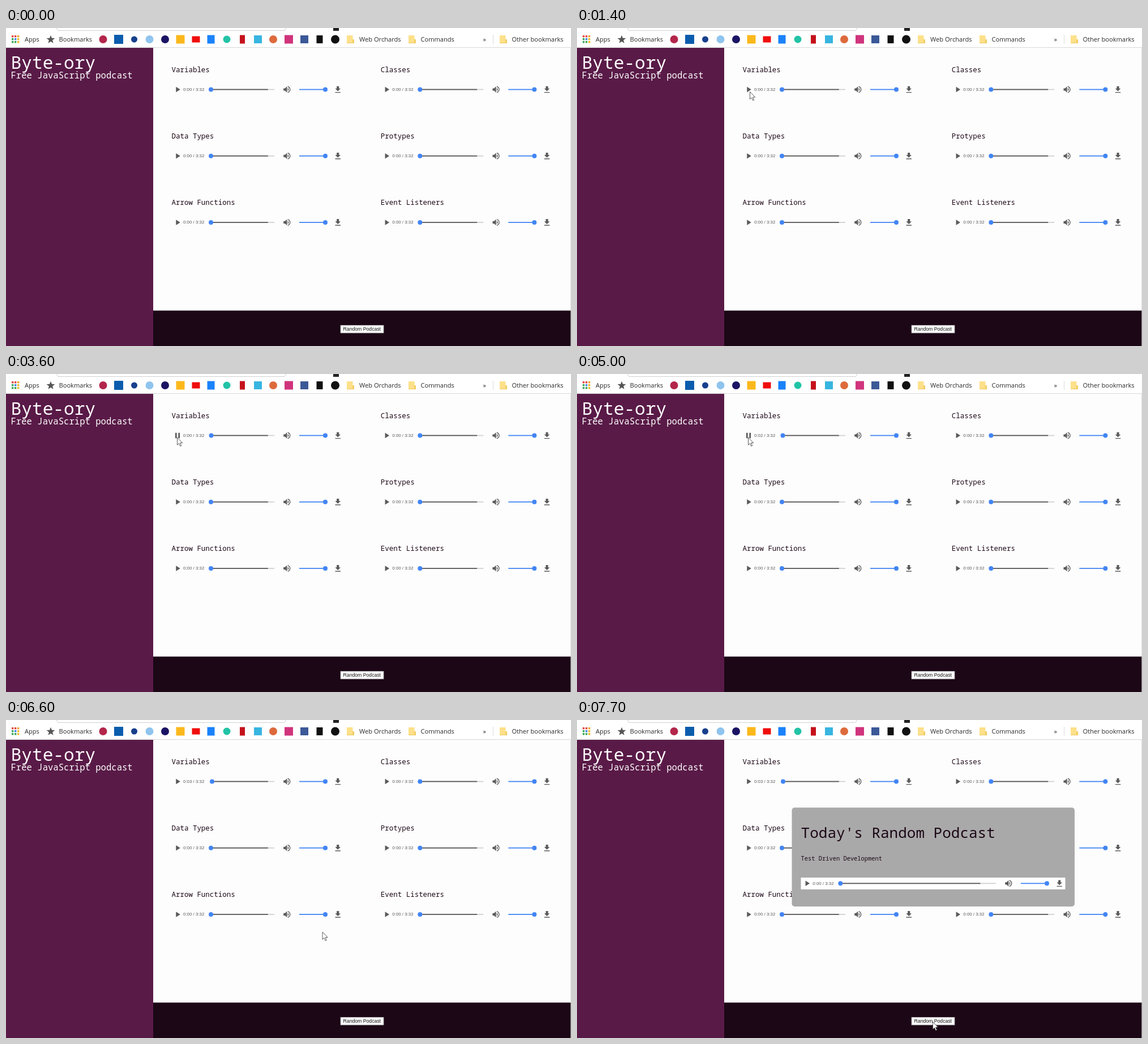
Recreate the animation shown at these times as an HTML page with a canvas. Size 998 by 561 pixels, loop 8000 ms.

```html
<!DOCTYPE html>
<html lang="en">
<head>
<meta charset="utf-8">
<title>Podcast page</title>
<style>
  html, body { margin: 0; width: 100%; height: 100%; overflow: hidden; background: #fdfdfd; }
  canvas { display: block; }
</style>
</head>
<body>
<canvas id="stage" width="998" height="561"></canvas>
<script>
const ctx = document.getElementById('stage').getContext('2d');
const LOOP = 8000;
const MONO = '"Noto Sans Mono", "DejaVu Sans Mono", monospace';
const ARIAL = '"Liberation Sans", Arial, sans-serif';
const UI = '"Open Sans", "Noto Sans", sans-serif';
const INK = '#1c0716', GREY = '#5a5a5a', BLUE = '#4285f4';

const ICON = {
  play: new Path2D('M8 5v14l11-7z'),
  pause: new Path2D('M6 19h4V5H6zM14 5v14h4V5z'),
  volume: new Path2D('M3 9v6h4l5 5V4L7 9H3zm13.5 3c0-1.77-1.02-3.29-2.5-4.03v8.05c1.48-.73 2.5-2.25 2.5-4.02zM14 3.23v2.06c2.89.86 5 3.54 5 6.71s-2.11 5.85-5 6.71v2.06c4.01-.91 7-4.49 7-8.77s-2.99-7.86-7-8.77z'),
  download: new Path2D('M19 9h-4V3H9v6H5l7 7 7-7zM5 18v2h14v-2H5z')
};
const ARROW = new Path2D('M0 0V13.2L3 10.4L5.2 15.4L7.2 14.5L5 9.6H9.2Z');

// Bookmark icons: centre x, colour, width, height (no height: circle)
const MARKS = [
  [171.5, '#b3264a', 14], [199, '#0b5cad', 16, 16], [226.5, '#173f8c', 11],
  [253.5, '#8fc4ee', 14], [281, '#1b1464', 14], [308, '#fbb81b', 15, 15],
  [335.5, '#f00d0d', 14, 11], [362, '#1a82fb', 13, 15], [390, '#22c3a6', 13],
  [417.5, '#c4121c', 9, 15], [445, '#38b5e0', 14, 14], [472, '#dd6a3c', 14],
  [499.5, '#d0347c', 15, 15], [527, '#3b5998', 14, 14], [554, '#111', 11, 14],
  [581.5, '#111', 15]
];
const DOTS = ['#e2483d', '#e2483d', '#f0a92c', '#3aa757', '#4285f4', '#f0b92c', '#3aa757', '#3aa757', '#f0b92c'];
const TITLES = [['Variables', 'Classes'], ['Data Types', 'Protypes'], ['Arrow Functions', 'Event Listeners']];

// Pointer: time, x, y (held until the next entry)
const POINTER = [
  [100, 491, 3], [200, 491, 11], [600, 466, 13], [700, 418, 20], [800, 379, 29],
  [1100, 367, 45], [1200, 338, 78], [1300, 314, 104], [1400, 305, 112], [1600, 302, 111.5],
  [6200, 483, 286.5], [6400, 525, 320.5], [6600, 558.5, 373.5], [6700, 580, 411], [6800, 597, 446],
  [6900, 610, 476], [7000, 619, 501], [7100, 626, 520], [7200, 628, 531], [7400, 628, 532]
];

function rect(x, y, w, h, color) {
  ctx.fillStyle = color;
  ctx.fillRect(x, y, w, h);
}

function disc(x, y, r, color) {
  ctx.fillStyle = color;
  ctx.beginPath();
  ctx.arc(x, y, r, 0, Math.PI * 2);
  ctx.fill();
}

function text(str, x, y, size, family, color) {
  ctx.font = `${size}px ${family}`;
  ctx.fillStyle = color;
  ctx.fillText(str, x, y);
}

function icon(path, x, y) {
  ctx.save();
  ctx.translate(x, y);
  ctx.scale(0.68, 0.68);
  ctx.translate(-12, -12);
  ctx.fillStyle = GREY;
  ctx.fill(path);
  ctx.restore();
}

function player(x, y, end, state = {}) {
  const { playing = false, seconds = 0, shift = 0 } = state;
  const start = x + 69, knob = start + shift;
  icon(playing ? ICON.pause : ICON.play, x + 10, y);
  text(`0:0${seconds} / 3:32`, x + 20, y + 2.5, 7.9, ARIAL, GREY);
  rect(start, y - 0.9, end - start, 1.8, '#d2d2d2');
  rect(start, y - 0.9, (end - start) * 0.9, 1.8, GREY);
  rect(start, y - 0.9, shift, 1.8, BLUE);
  disc(knob, y, 4, BLUE);
  icon(ICON.volume, end + 22.3, y);
  rect(end + 44, y - 0.9, 46, 1.8, BLUE);
  disc(end + 90, y, 4, BLUE);
  icon(ICON.download, end + 112.2, y + 0.3);
}

function star(x, y, r) {
  ctx.fillStyle = '#555';
  ctx.beginPath();
  for (let i = 0; i < 10; i++) {
    const a = i * Math.PI / 5 - Math.PI / 2, d = i % 2 ? r * 0.42 : r;
    ctx.lineTo(x + d * Math.cos(a), y + d * Math.sin(a));
  }
  ctx.fill();
}

function folder(x) {
  rect(x, 13, 10.5, 14, '#fde08a');
  rect(x + 10, 20, 3, 7, '#f3cd66');
  rect(x, 26, 13, 1, '#f0c85c');
}

function toolbar() {
  rect(0, 0, 998, 35, '#fff');
  rect(0, 34, 998, 1, '#d8d8d8');
  ctx.strokeStyle = '#cfcfcf';
  ctx.lineWidth = 1;
  ctx.beginPath();
  ctx.moveTo(90, 0);
  ctx.quadraticCurveTo(90, 4.5, 93, 4.5);
  ctx.lineTo(491, 4.5);
  ctx.quadraticCurveTo(494, 4.5, 494, 0);
  ctx.stroke();
  rect(578, 0, 10, 5, '#222');

  DOTS.forEach((c, i) => rect(10 + i % 3 * 5, 13 + Math.floor(i / 3) * 5, 3.4, 3.4, c));
  star(79, 20.5, 7.8);
  for (const [x, color, w, h] of MARKS) {
    if (h) rect(x - w / 2, 20 - h / 2, w, h, color);
    else disc(x, 20, w / 2, color);
  }
  [602, 711, 872].forEach(folder);
  rect(860, 12, 1, 16, '#dcdcdc');

  const label = (str, x) => text(str, x, 24, 11.1, UI, '#2a2a2a');
  label('Apps', 33);
  label('Bookmarks', 93.5);
  label('Web Orchards', 624);
  label('Commands', 732.5);
  label('»', 842.5);
  label('Other bookmarks', 893.5);
}

function page(first) {
  rect(0, 35, 260, 526, '#591a47');
  text('Byte-ory', 8.5, 72, 31.2, MONO, '#fff');
  text('Free JavaScript podcast', 8.5, 89, 15.6, MONO, '#fff');
  TITLES.forEach((row, r) => row.forEach((title, c) => {
    const x = 293 + c * 369.3, y = 108.5 + r * 117.2;
    text(title, x - 0.5, y - 30.7, 12.48, MONO, INK);
    player(x, y, x + 181, r + c ? {} : first);
  }));
  rect(260, 498.5, 738, 62.5, INK);
  rect(590.5, 524, 77, 14.5, '#8a8a8a');
  rect(591.3, 524.8, 75.4, 12.9, '#fff');
  text('Random Podcast', 595.6, 534.2, 8.67, ARIAL, '#111');
  rect(997.3, 35, 0.7, 526, '#d0d0d0');
}

function modal() {
  ctx.fillStyle = '#a9a9a9';
  ctx.beginPath();
  ctx.roundRect(379.5, 154.5, 499.5, 174.5, 5);
  ctx.fill();
  text("Today's Random Podcast", 395.6, 208, 26, MONO, INK);
  text('Test Driven Development', 395.6, 248, 10.4, MONO, INK);
  rect(395.5, 278, 467, 20.8, '#fff');
  player(396.3, 288.3, 740);
}

function pointer(t) {
  const at = POINTER.findLast(p => p[0] <= t);
  if (!at) return;
  ctx.save();
  ctx.translate(at[1] + 0.5, at[2] + 0.5);
  ctx.fillStyle = '#fff';
  ctx.strokeStyle = '#333';
  ctx.lineWidth = 0.8;
  ctx.fill(ARROW);
  ctx.stroke(ARROW);
  ctx.restore();
}

const passed = (t, times) => times.filter(v => t >= v).length;

function draw(t) {
  rect(0, 0, 998, 561, '#fdfdfd');
  toolbar();
  page({
    playing: t >= 1900 && t < 5900,
    seconds: passed(t, [4100, 5000, 5900]),
    shift: passed(t, [3600, 4100, 4800, 5700]) * 0.5
  });
  if (t >= 7700) modal();
  pointer(t);
}

function tick() {
  draw(performance.now() % LOOP);
  requestAnimationFrame(tick);
}
tick();
</script>
</body>
</html>
```
